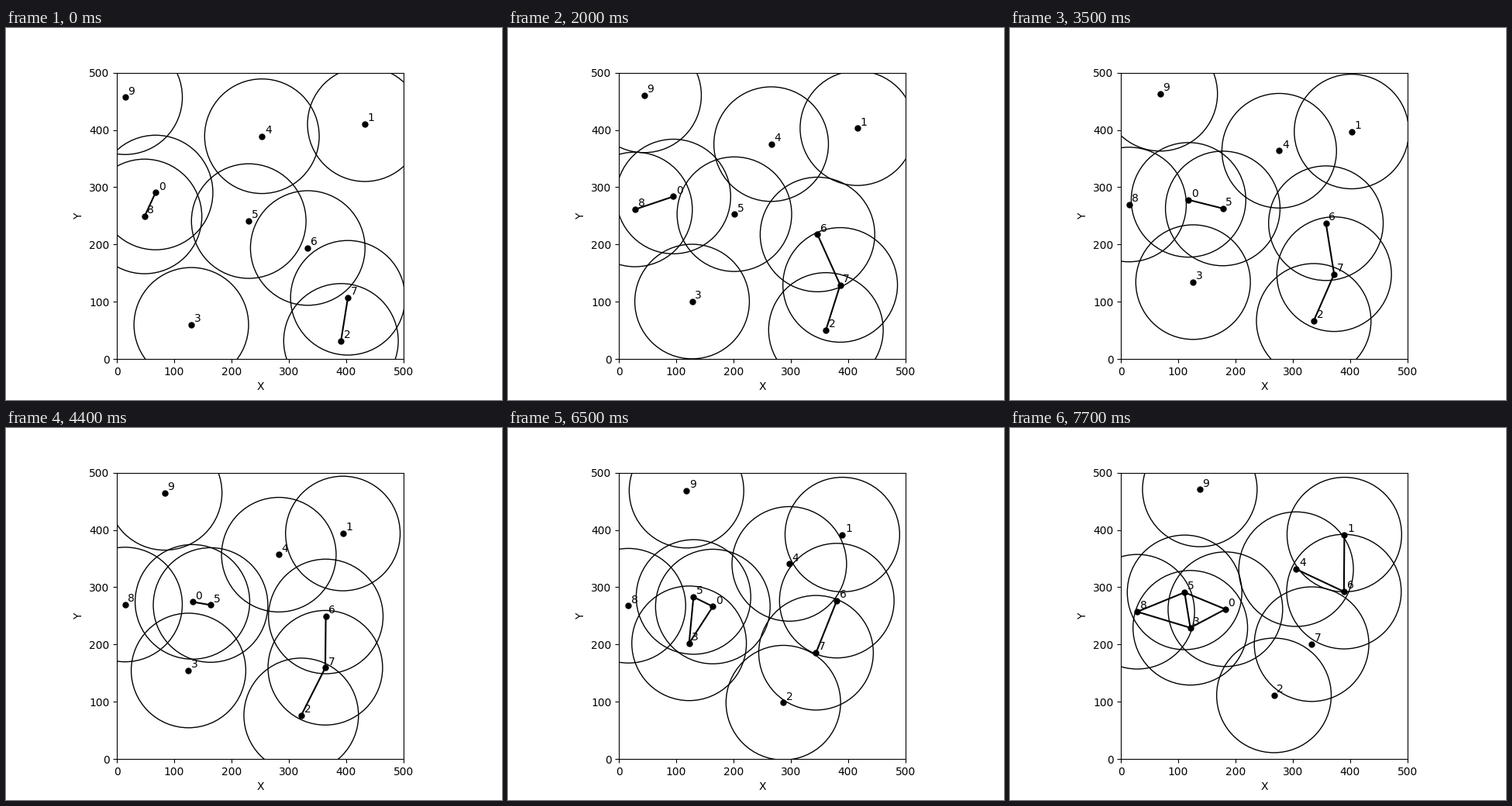
A matplotlib script for the animation above (8000 ms loop, 640 px wide and 480 px high).

```python
from itertools import combinations

import matplotlib.pyplot as plt
import numpy as np
from matplotlib.animation import FuncAnimation
from matplotlib.patches import Circle

AREA = 500         # side of the square the nodes roam in
RANGE = 100        # radio radius and largest link length
PAUSE = 10         # steps a node rests at a waypoint
LAST_STEP = 25
FIRST_MS, STEP_MS = 500, 300
FRAME_MS, LOOP_MS = 100, 8000


def roam(start, goal, onward=None, arrive=LAST_STEP):
    """Random-waypoint motion: steady walk, rest, then steady walk onward."""
    start, goal = np.array(start), np.array(goal)
    onward = goal if onward is None else np.array(onward)
    depart = arrive + PAUSE

    def position(step):
        walked = min(step / arrive, 1)
        left = max(step - depart, 0) / abs(LAST_STEP - depart)
        return start + walked * (goal - start) + left * (onward - goal)

    return position


nodes = [
    roam((67.4, 290.8), (182.2, 261.6)),
    roam((432.6, 410), (389.9, 391.9), arrive=15.6),
    roam((391, 31.8), (267, 111.2)),
    roam((129.7, 59.8), (121, 229.2)),
    roam((253, 389), (305.7, 331.5)),
    roam((230, 240.9), (111, 291)),
    roam((333, 193.9), (389.2, 292.3)),
    roam((403, 107), (332.7, 200.6)),
    roam((48.1, 249), (14, 269.8), onward=(28.4, 257.2), arrive=10.2),
    roam((14.1, 457.1), (137.6, 470.7)),
]
pairs = list(combinations(range(len(nodes)), 2))


def step_at(ms):
    return max(0, (ms - FIRST_MS) // STEP_MS + 1)


plt.rcParams["font.family"] = "DejaVu Sans"
fig, ax = plt.subplots(figsize=(6.4, 4.8), dpi=100)
ticks = range(0, AREA + 1, 100)
ax.set(xlim=(0, AREA), ylim=(0, AREA), aspect="equal",
       xlabel="X", ylabel="Y", xticks=ticks, yticks=ticks)

circles = [ax.add_patch(Circle((0, 0), RANGE, fill=False, ec="k", lw=1))
           for _ in nodes]
links = [ax.plot([], [], "k-", lw=1.5)[0] for _ in pairs]
dots, = ax.plot([], [], "ko", ms=5)
labels = [ax.text(0, 0, str(i)) for i in range(len(nodes))]


def update(frame):
    step = step_at(frame * FRAME_MS)
    points = np.array([position(step) for position in nodes])
    dots.set_data(*points.T)
    for circle, label, point in zip(circles, labels, points):
        circle.center = point
        label.set_position(point + 5)
    for link, pair in zip(links, pairs):
        ends = points[list(pair)]
        link.set_data(*ends.T)
        link.set_visible(np.hypot(*(ends[0] - ends[1])) < RANGE)
    return [*circles, *links, dots, *labels]


anim = FuncAnimation(fig, update, frames=LOOP_MS // FRAME_MS,
                     init_func=lambda: update(0), interval=FRAME_MS,
                     repeat=True, repeat_delay=0)
plt.show()
```
